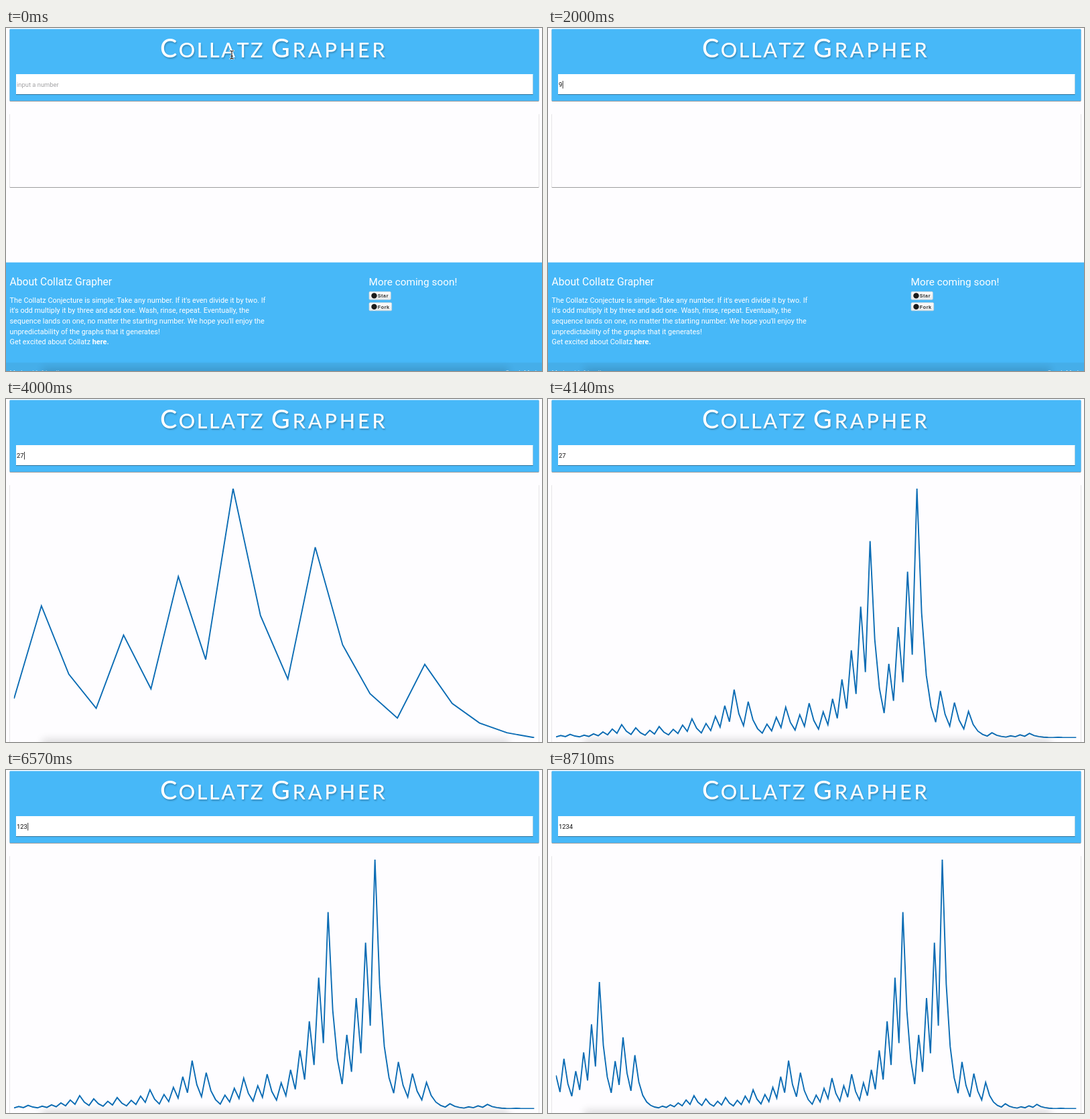
Animation of 800 by 513 pixels, one loop 8.85 s. Source, as an HTML page:

```html
<!DOCTYPE html>
<html lang="en">
<head>
<meta charset="utf-8">
<title>Collatz Grapher</title>
<style>
  html, body { margin: 0; width: 100%; height: 100%; overflow: hidden; background: #fefdff; }
  svg { display: block; width: 800px; height: 513px; font-family: Roboto, sans-serif; }
  .blue { fill: #47b8f8; }
  .raised { filter: drop-shadow(0 1px .7px rgba(0, 0, 0, .38)); }
  .title { font: 500 38px Lato, sans-serif; font-kerning: none; fill: #fff; filter: drop-shadow(1px 2px 1px rgba(0, 0, 0, .24)); }
  .small { font-size: 30.5px; }
  .field { font-size: 9.4px; }
  .footer { fill: #fff; font-size: 10.85px; }
  .button rect { fill: url(#buttonFill); stroke: #cfd3d6; stroke-width: .7; }
  .button circle { fill: #1b1b1b; }
  .button text { font: bold 7.2px "Liberation Sans", Arial, sans-serif; letter-spacing: .6px; fill: #333; }
</style>
</head>
<body>
<svg viewBox="0 0 800 513">
  <defs>
    <linearGradient id="buttonFill" x2="0" y2="1">
      <stop stop-color="#fcfcfc"/><stop offset="1" stop-color="#e9ebec"/>
    </linearGradient>
    <clipPath id="plot"><rect x="11.7" y="134" width="777" height="373"/></clipPath>
    <filter id="soft" x="-10%" y="-100%" width="120%" height="300%"><feGaussianBlur stdDeviation="6"/></filter>
  </defs>
  <rect width="800" height="513" fill="#fefdff"/>

  <rect class="blue raised" x="5.5" y="1.5" width="790" height="107.5" rx="1"/>
  <g class="title">
    <text x="230" y="44" letter-spacing="2.5">C<tspan class="small">OLLATZ</tspan></text>
    <text x="396" y="44" letter-spacing="3.9">G<tspan class="small">RAPHER</tspan></text>
  </g>
  <rect class="raised" x="15" y="69" width="771.5" height="30" fill="#fff"/>
  <text id="entry" class="field" x="16" y="88"></text>
  <rect id="caret" y="79" width=".9" height="11.5" fill="#222"/>

  <rect id="card" class="raised" x="5.5" y="127.5" width="790" rx="1" fill="#fefdff"/>
  <path id="curve" clip-path="url(#plot)" fill="none" stroke="#0b6cb4" stroke-width="1.9"/>

  <g id="footer" class="footer">
    <rect class="blue" y="350.6" width="800" height="163"/>
    <rect y="500.5" width="800" height="13" fill="#333" opacity=".08"/>
    <text font-size="15.65" x="5.5" y="385">About Collatz Grapher</text>
    <g id="about"></g>
    <text x="5.5" y="473.2">Get excited about Collatz <tspan font-weight="bold">here.</tspan></text>
    <text font-size="15.35" x="541.5" y="385">More coming soon!</text>
    <g class="button">
      <rect x="542" y="394.3" width="32.3" height="12" rx="1.5"/>
      <circle cx="549.5" cy="400.4" r="4.2"/>
      <text x="554.7" y="403">Star</text>
    </g>
    <g class="button">
      <rect x="542" y="410.8" width="33.7" height="12" rx="1.5"/>
      <circle cx="549.5" cy="416.9" r="4.2"/>
      <text x="554.7" y="419.5">Fork</text>
    </g>
    <g font-size="9.6" opacity=".8">
      <text x="5.5" y="518.7">Made with friendly</text>
      <text x="795" y="518.7" text-anchor="end">Graph Math</text>
    </g>
  </g>

  <rect x="54" y="508" width="696" height="40" opacity=".12" filter="url(#soft)"/>
  <g id="pointer" fill="none" stroke-linecap="round">
    <path d="M-2.5-6Q0-6 0-4.5V4.5Q0 6-2.5 6M2.5-6Q0-6 0-4.5M0 4.5Q0 6 2.5 6M-1.5 2H1.5" stroke="#fff" stroke-width="2.4"/>
    <path d="M-2.5-6Q0-6 0-4.5V4.5Q0 6-2.5 6M2.5-6Q0-6 0-4.5M0 4.5Q0 6 2.5 6M-1.5 2H1.5" stroke="#111" stroke-width="1.1"/>
  </g>
</svg>
<script>
const LOOP = 8850, TICK = 1000 / 7;
const $ = id => document.getElementById(id);

// start time, field text, caret shown, graphed number
const STATES = [
  [0, "", 0, 0], [570, "", 1, 0], [1000, "", 0, 0], [1570, "", 1, 0],
  [2000, "9", 1, 0], [2140, "9", 0, 9], [2570, "9", 1, 9],
  [3000, "", 1, 9], [3140, "", 0, 9], [3710, "2", 1, 9], [3860, "27", 1, 9],
  [4140, "27", 0, 27], [4570, "27", 1, 27], [5000, "2", 1, 27], [5140, "", 1, 27], [5290, "", 0, 27],
  [6290, "1", 1, 27], [6430, "12", 1, 27], [6570, "123", 1, 27], [6710, "1234", 1, 27],
  [6860, "1234", 1, 1234], [7290, "1234", 0, 1234], [7710, "1234", 1, 1234], [8290, "1234", 0, 1234]
];

const ABOUT = [
  "The Collatz Conjecture is simple: Take any number. If it's even divide it by two. If",
  "it's odd multiply it by three and add one. Wash, rinse, repeat. Eventually, the",
  "sequence lands on one, no matter the starting number. We hope you'll enjoy the",
  "unpredictability of the graphs that it generates!"
];
$("about").innerHTML = ABOUT.map((line, i) =>
  `<text x="5.5" y="${410.7 + i * 15.6}">${line}</text>`).join("");

function collatz(n) {
  const values = [n];
  while (n > 1) values.push(n = n % 2 ? 3 * n + 1 : n / 2);
  return values;
}

function curvePath(seed) {
  if (!seed) return "";
  const values = collatz(seed), max = Math.max(...values);
  const point = (v, i) => [
    (12 + 776.5 * i / (values.length - 1)).toFixed(2),
    (506.5 - 372.5 * (v - 1) / (max - 1)).toFixed(2)
  ];
  return "M" + values.map(point).join("L");
}
const curves = Object.fromEntries([0, 9, 27, 1234].map(n => [n, curvePath(n)]));

function movePointer(t) {
  const stepped = Math.floor((t + 5) / TICK) * TICK;
  const k = Math.min(1, stepped / 710);
  const ease = k * k * (3 - 2 * k);
  $("pointer").setAttribute("transform", `translate(${337 - 7 * ease} ${40 + 45 * ease})`);
  $("pointer").style.display = t < 2000 ? "" : "none";
}

let shown;
function render(t) {
  movePointer(t);
  const state = STATES.findLast(s => s[0] <= t);
  if (state === shown) return;
  shown = state;
  const [, text, caret, seed] = state;
  $("entry").textContent = text || "input a number";
  $("entry").setAttribute("fill", text ? "#111" : "#a3a3a5");
  $("caret").setAttribute("x", text ? 16.4 + text.length * 5.3 : 15.5);
  $("caret").style.display = caret ? "" : "none";
  $("curve").setAttribute("d", curves[seed]);
  $("card").setAttribute("height", seed ? 400 : 110.5);
  $("footer").style.display = seed ? "none" : "";
}

const start = performance.now();
function frame() {
  render((performance.now() - start) % LOOP);
  requestAnimationFrame(frame);
}
frame();
</script>
</body>
</html>
```
